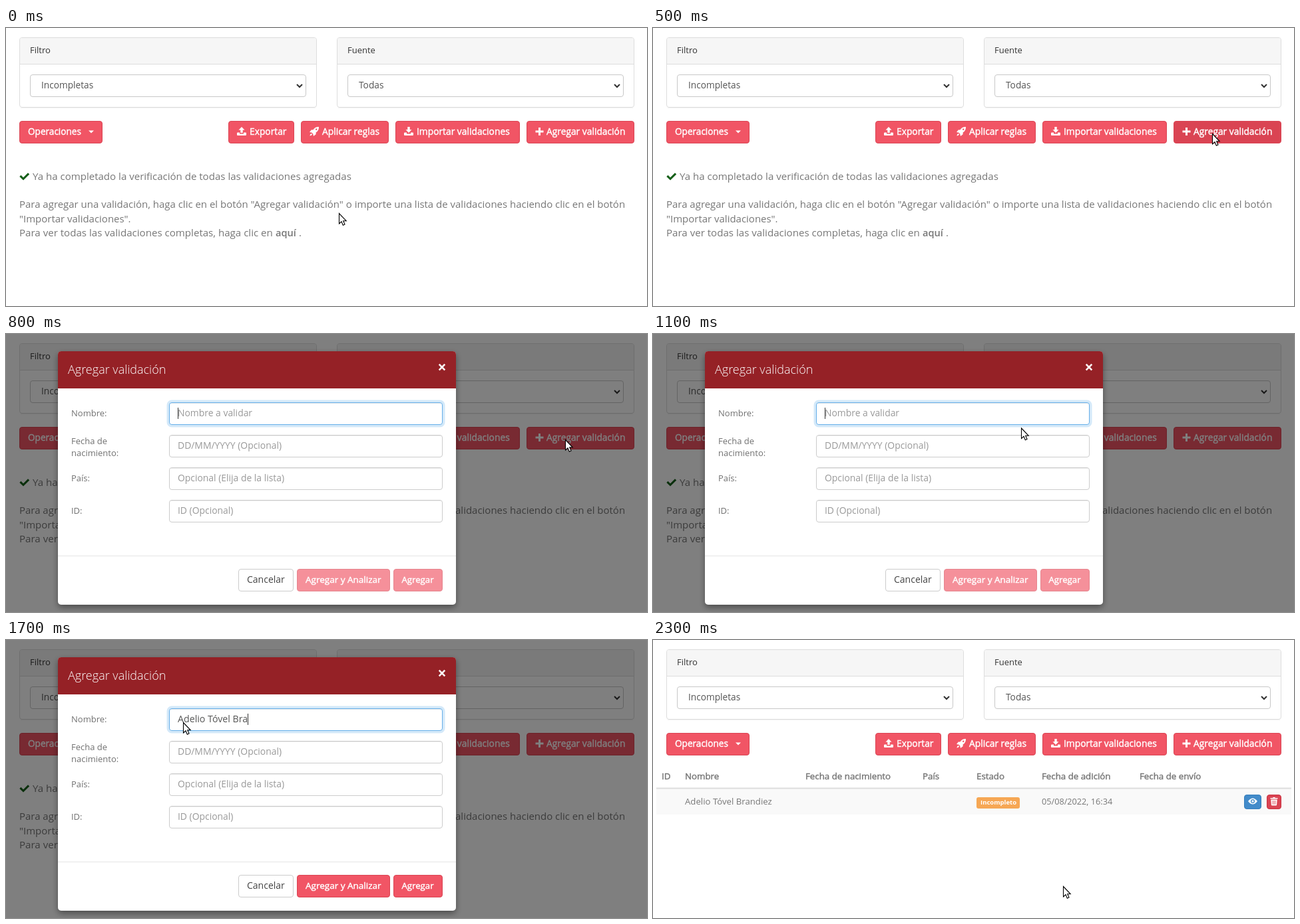
These frames come from a looping animation (963 px wide and 419 px high, 4300 ms). An HTML page:

```html
<!DOCTYPE html>
<html lang="es">
<head>
<meta charset="utf-8">
<title>Agregar validación</title>
<style>
  html, body { margin: 0; width: 100%; height: 100%; overflow: hidden; background: #fff; }
  svg { display: block; width: 100%; height: 100%; }
  text { font-family: "Open Sans", "Noto Sans", sans-serif; white-space: pre; }
  .medium { stroke-width: .45px; }
</style>
</head>
<body>
<svg id="stage" viewBox="0 0 963 419" xmlns="http://www.w3.org/2000/svg"></svg>
<script>
const LOOP = 4300;
const RED = '#f15565', DARK_RED = '#da4453';
const PERSON = 'Adelio Tóvel Brandiez';

const text = (x, y, size, fill, str, attrs = '') =>
  `<text x="${x}" y="${y}" font-size="${size}" fill="${fill}" ${attrs}>${str}</text>`;
const medium = (x, y, size, fill, str) =>
  text(x, y, size, fill, str, `class="medium" stroke="${fill}"`);
const box = (x, y, w, h, fill, stroke, attrs = '') =>
  `<rect x="${x + .5}" y="${y + .5}" width="${w - 1}" height="${h - 1}" rx="3.5" fill="${fill}" stroke="${stroke}" ${attrs}/>`;
const at = (x, y, content) => `<g transform="translate(${x} ${y})">${content}</g>`;
const path = (d, attrs = 'fill="#fff"') => `<path d="${d}" ${attrs}/>`;
const line = (d, color, width, attrs = '') =>
  path(d, `fill="none" stroke="${color}" stroke-width="${width}" ${attrs}`);

// Icons are drawn inside a 14 by 14 cell.
const tray = path('M1 8.5H4V10.5H10V8.5H13Q14 8.5 14 9.5V12Q14 13 13 13H1Q0 13 0 12V9.5Q0 8.5 1 8.5Z');
const icons = {
  upload: tray + path('M7 0L11.5 4.7H8.7V9H5.3V4.7H2.5Z'),
  download: tray + path('M5.3 0H8.7V4.3H11.5L7 9L2.5 4.3H5.3Z'),
  rocket: path('M14 0Q14.2 5.5 9.6 8.6V11.2L6 14L5.2 10.4L3.6 8.8L0 8L2.8 4.4H5.4Q8.5-.2 14 0ZM3 10L4 11Q3.5 13.4 .4 13.6Q.6 10.5 3 10Z')
    + `<circle cx="10.2" cy="3.8" r="1.2" fill="${RED}"/>`,
  plus: path('M5 1H8V5.5H12.5V8.5H8V13H5V8.5H.5V5.5H5Z'),
  eye: path('M0 5Q7-4 14 5Q7 14 0 5Z')
    + '<circle cx="7" cy="5" r="3" fill="#428bca"/><circle cx="7" cy="5" r="1.7" fill="#fff"/>',
  trash: path('M0 1.5H3.5L4.3 .5H6.7L7.5 1.5H11V3H0ZM.8 4H10.2L9.6 12Q9.5 13 8.5 13H2.5Q1.5 13 1.4 12Z')
    + line('M3.5 5.5V11.3M5.5 5.5V11.3M7.5 5.5V11.3', DARK_RED, .8)
};

const iconButton = (x, w, icon, label, id = '') =>
  box(x, 140, w, 34, RED, DARK_RED, id) + at(x + 13, 149, icons[icon])
  + medium(x + (icon === 'plus' ? 30 : 32), 161, 13.8, '#fff', label);

function panel(x, title, value) {
  return box(x, 14, 447, 106, '#fff', '#ddd')
    + `<path d="M${x + 1} 54V18Q${x + 1} 15 ${x + 4} 15H${x + 443}Q${x + 446} 15 ${x + 446} 18V54Z" fill="#f6f6f6"/>`
    + line(`M${x} 54.5H${x + 447}`, '#ddd', 1)
    + line(`M${x + 2} 120.5H${x + 445}`, '#000', 1, 'opacity=".05"')
    + text(x + 16, 38, 13, '#333', title)
    + box(x + 16, 70, 415, 34, '#fff', '#c8c8c8')
    + text(x + 33, 91, 13.7, '#555', value)
    + line(`M${x + 417} 85L${x + 421} 89L${x + 425} 85`, '#333', 2);
}

function field(y, placeholder, id) {
  return box(245, y, 411, 34, '#fff', '#ccc', id)
    + line(`M248 ${y + 1.5}H653`, '#000', 1, 'opacity=".08"')
    + text(258, y + 21, 13.9, '#999', placeholder, id ? 'id="nameText"' : '');
}

const toolbar = box(20, 140, 125, 34, RED, DARK_RED)
  + medium(33, 161, 13.6, '#fff', 'Operaciones')
  + path('M124 154.5H132L128 158.5Z')
  + iconButton(334, 99, 'upload', 'Exportar')
  + iconButton(443, 132, 'rocket', 'Aplicar reglas')
  + iconButton(585, 187, 'download', 'Importar validaciones')
  + iconButton(782, 162, 'plus', 'Agregar validación', 'id="openButton"');

const emptyMessage = path('M20.3 224L22.5 221.8L26 225.2L33 218.2L35.2 220.4L26 229.5Z', 'fill="#17601a"')
  + text(40, 229, 15.05, '#777', 'Ya ha completado la verificación de todas las validaciones agregadas')
  + text(20, 271, 14.97, '#777', 'Para agregar una validación, haga clic en el botón "Agregar validación" o importe una lista de validaciones haciendo clic en el botón')
  + text(20, 293, 14.97, '#777', '"Importar validaciones".')
  + text(20, 314, 15.1, '#777', 'Para ver todas las validaciones completas, haga clic en')
  + text(405, 314, 14.6, '#777', 'aquí', 'font-weight="600"')
  + text(440, 314, 15, '#777', '.');

const columns = [[13, 'ID'], [48, 'Nombre'], [229, 'Fecha de nacimiento'], [405, 'País'],
  [486, 'Estado'], [584, 'Fecha de adición'], [731, 'Fecha de envío']];
const table = columns.map(([x, name]) => medium(x, 210, 13.3, '#777', name)).join('')
  + '<rect x="5" y="224" width="954" height="39" fill="#f9f9f9"/>'
  + line('M5 223.5H959', '#ddd', 2)
  + text(48, 248, 13.2, '#777', PERSON)
  + '<rect x="486" y="237" width="65" height="17" rx="3" fill="#f6a754"/>'
  + text(492, 248, 9.5, '#fff', 'Incompleto', 'font-weight="700"')
  + text(584, 248, 12.7, '#777', '05/08/2022, 16:34')
  + box(888, 233, 26, 22, '#428bca', '#357ebd') + at(894, 238, icons.eye)
  + box(922, 233, 22, 22, DARK_RED, '#c9303f') + at(927.5, 236.5, icons.trash);

const modal = '<rect width="963" height="419" fill="#000" opacity=".5"/>'
  + '<rect x="78" y="26" width="598" height="382" rx="5" fill="#fff" filter="url(#shadow)"/>'
  + path('M78 82V31Q78 26 83 26H671Q676 26 676 31V82Z', 'fill="#952126"')
  + text(93, 60, 18, '#fff', 'Agregar validación', 'font-weight="300"')
  + line('M650.7 45.7L659.3 54.3M659.3 45.7L650.7 54.3', '#fff', 2.6)
  + [[124, 'Nombre:'], [166, 'Fecha de'], [184, 'nacimiento:'], [222, 'País:'], [271, 'ID:']]
    .map(([y, label]) => text(98, y, 13, '#707070', label)).join('')
  + '<rect id="glow" x="243.5" y="101.5" width="414" height="37" rx="5.5" fill="none" stroke="#66afe9" stroke-width="4" opacity=".28"/>'
  + field(103, 'Nombre a validar', 'id="nameField"')
  + '<rect id="caret" y="111" width="1" height="17" fill="#333"/>'
  + field(152, 'DD/MM/YYYY (Opcional)')
  + field(201, 'Opcional (Elija de la lista)')
  + field(250, 'ID (Opcional)')
  + line('M78 334.5H676', '#e5e5e5', 1)
  + box(349, 354, 83, 34, '#fff', '#ccc')
  + text(362, 375, 14, '#444', 'Cancelar')
  + '<g id="actions">' + box(437, 354, 140, 34, RED, DARK_RED)
  + medium(450, 375, 13.5, '#fff', 'Agregar y Analizar')
  + box(582, 354, 74, 34, RED, DARK_RED, 'id="addButton"')
  + medium(594.5, 375, 13.2, '#fff', 'Agregar') + '</g>';

document.getElementById('stage').innerHTML = `
  <defs><filter id="shadow" x="-10%" y="-10%" width="120%" height="125%">
    <feDropShadow dx="0" dy="4" stdDeviation="5" flood-color="#000" flood-opacity=".4"/>
  </filter></defs>
  <rect width="963" height="419" fill="#fff"/>
  ${panel(20, 'Filtro', 'Incompletas')}${panel(497, 'Fuente', 'Todas')}${toolbar}
  <g id="emptyMessage">${emptyMessage}</g>
  <g id="table">${table}</g>
  <g id="modal">${modal}</g>
  <path id="cursor" d="M.5 .5V16L4 12.8L6.3 18.2L9 17L6.7 11.8H11.2Z" fill="#fff" stroke="#000" stroke-width="1.1"/>`;

const el = {};
document.querySelectorAll('[id]').forEach(node => { el[node.id] = node; });
const show = (node, visible) => node.setAttribute('display', visible ? 'inline' : 'none');
const clamp = v => Math.max(0, Math.min(1, v));

const stops = [[0, 500, 279], [500, 840, 159], [800, 840, 159],
  [1400, 266, 124], [1800, 266, 124], [2100, 616, 371]];

function cursorAt(t) {
  let [, x, y] = stops[0];
  for (let i = 1; i < stops.length; i++) {
    const [t0, x0, y0] = stops[i - 1], [t1, x1, y1] = stops[i];
    if (t < t0) break;
    const k = clamp((t - t0) / (t1 - t0));
    x = x0 + (x1 - x0) * k;
    y = y0 + (y1 - y0) * k;
  }
  return [x, y];
}

function render(time) {
  const t = Math.floor((time % LOOP) / 100) * 100;
  const done = t >= 2300, focused = t < 2100;
  const typed = PERSON.slice(0, Math.round(PERSON.length * clamp((t - 1400) / 400)));

  show(el.emptyMessage, !done);
  show(el.table, done);
  show(el.modal, t >= 700 && !done);
  el.modal.setAttribute('opacity', t < 800 ? .5 : 1);
  el.openButton.setAttribute('fill', t >= 500 && t < 800 ? DARK_RED : RED);

  el.nameText.textContent = typed || 'Nombre a validar';
  el.nameText.setAttribute('fill', typed ? '#555' : '#999');
  el.nameText.setAttribute('font-size', typed ? 14.2 : 13.9);
  el.nameField.setAttribute('stroke', focused ? '#66afe9' : '#ccc');
  show(el.glow, focused);
  show(el.caret, focused);
  el.caret.setAttribute('x', 258 + (typed ? Math.round(el.nameText.getComputedTextLength()) : 0));
  el.actions.setAttribute('opacity', typed ? 1 : .65);
  el.addButton.setAttribute('fill', focused ? RED : DARK_RED);

  const [x, y] = cursorAt(t);
  el.cursor.setAttribute('transform', `translate(${x} ${y})`);
}

const start = performance.now();
function tick() {
  render(performance.now() - start);
  requestAnimationFrame(tick);
}
tick();
</script>
</body>
</html>
```
